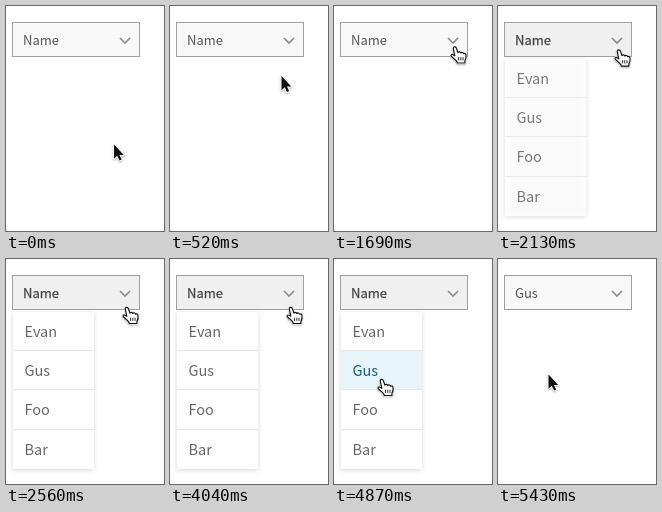
Animation, 158 px wide and 225 px high, one loop 6.43 s. Source, as an HTML page with a canvas:

```html
<!DOCTYPE html>
<html lang="en">
<head>
<meta charset="utf-8">
<title>Dropdown</title>
<style>
html, body { margin: 0; width: 100%; height: 100%; overflow: hidden; background: #fff; }
canvas { display: block; width: 158px; height: 225px; }
</style>
</head>
<body>
<canvas id="stage"></canvas>
<script>
const W = 158, H = 225, LOOP = 6430;
const OPEN = 2000, CLOSE = 5340;
const FONT = '"Noto Sans CJK JP", "Noto Sans CJK SC", "Noto Sans", sans-serif';
const ITEMS = ['Evan', 'Gus', 'Foo', 'Bar'];
const PICK = 1;
const MENU = { x: 7, y: 53, w: 81, h: 157, row: 39.2 };

// time, x, y of the pointer's hot spot
const PATH = [
  [40, 108, 138.5], [300, 111.5, 70], [520, 111.5, 70],
  [930, 121, 34], [1170, 121, 34], [1600, 121, 41],
  [1900, 121, 41], [2430, 121, 48.5], [4040, 121, 48.5],
  [4650, 48, 118.5], [4870, 48, 120.5], [5300, 50.5, 115.5]
];

const ARROW = new Path2D('M0 0V14.2L3.2 11.2L5.5 16L7.7 15L5.4 10.4H9.8Z');
const HAND = new Path2D('M-1.7 1.6C-2-.4 .8-.8 1.4 1.2L2.9 5.6C3.4 4.4 5.4 4.6 5.8 6' +
  'C6.6 5 8.3 5.4 8.7 6.7C9.6 6 10.8 6.6 11 8C11.4 10.4 11 12 10 13.6L9.9 16H2.2L1.9 14.6' +
  'C.4 12.6-1.2 11.4-3.2 9.8C-4.8 8.5-3.6 7-2 7.7L-.2 8.8Z');
const KNUCKLES = new Path2D('M3.6 10.2V13.4M5.8 10.2V13.4M8 10.2V13.4');

const canvas = document.getElementById('stage');
const ctx = canvas.getContext('2d');
const dpr = window.devicePixelRatio || 1;
canvas.width = W * dpr;
canvas.height = H * dpr;

const clamp = v => Math.max(0, Math.min(1, v));
const ease = p => p * p * (3 - 2 * p);

function pointerAt(t) {
  let a = PATH[0];
  for (const b of PATH) {
    if (t < b[0]) {
      const p = ease(clamp((t - a[0]) / (b[0] - a[0])));
      return { x: a[1] + (b[1] - a[1]) * p, y: a[2] + (b[2] - a[2]) * p };
    }
    a = b;
  }
  return { x: a[1], y: a[2] };
}

const inside = (p, x, y, w, h) => p.x >= x && p.x < x + w && p.y >= y && p.y < y + h;

function label(text, x, y, size, color) {
  ctx.font = `${size}px ${FONT}`;
  ctx.fillStyle = color;
  ctx.fillText(text, x, y);
}

function drawField(text, open) {
  ctx.fillStyle = open ? '#f0f0f0' : '#f8f8f8';
  ctx.fillRect(6, 16, 128, 35);
  ctx.strokeStyle = '#a0a0a0';
  ctx.lineWidth = 1;
  ctx.strokeRect(6.5, 16.5, 127, 34);
  label(text, 17, 39, 13, open ? '#444' : '#555');
  if (open) {
    ctx.strokeStyle = '#444';
    ctx.lineWidth = 0.25;
    ctx.strokeText(text, 17, 39);
  }
  ctx.strokeStyle = '#8c8c8c';
  ctx.lineWidth = 1.6;
  ctx.beginPath();
  ctx.moveTo(114, 32);
  ctx.lineTo(119, 37);
  ctx.lineTo(124, 32);
  ctx.stroke();
}

function drawMenu(alpha, hover) {
  const { x, y, w, h, row } = MENU;
  ctx.save();
  ctx.globalAlpha = alpha;
  ctx.save();
  ctx.shadowColor = 'rgba(0,0,0,.16)';
  ctx.shadowBlur = 5 * dpr;
  ctx.shadowOffsetY = dpr;
  ctx.fillStyle = '#fff';
  ctx.fillRect(x, y, w, h);
  ctx.restore();
  ITEMS.forEach((item, i) => {
    const top = Math.round(y + i * row);
    if (i === hover) {
      ctx.fillStyle = '#e7f4fa';
      ctx.fillRect(x, top, w, 39);
    }
    if (i) {
      ctx.fillStyle = '#e8e8e8';
      ctx.fillRect(x, top - 1, w, 1);
    }
    label(item, 18.5, top + 24.5, 14.5, i === hover ? '#1b5a7a' : '#666');
  });
  ctx.restore();
}

function drawPointer(p, hand) {
  ctx.save();
  ctx.translate(p.x, p.y);
  ctx.lineJoin = 'round';
  ctx.save();
  ctx.shadowColor = 'rgba(0,0,0,.3)';
  ctx.shadowBlur = 2 * dpr;
  ctx.shadowOffsetY = dpr;
  ctx.strokeStyle = '#fff';
  ctx.lineWidth = 2;
  ctx.stroke(hand ? HAND : ARROW);
  ctx.restore();
  ctx.fillStyle = hand ? '#fff' : '#111';
  ctx.fill(hand ? HAND : ARROW);
  if (hand) {
    ctx.strokeStyle = '#111';
    ctx.lineWidth = 1.2;
    ctx.stroke(HAND);
    ctx.lineWidth = 0.9;
    ctx.stroke(KNUCKLES);
  }
  ctx.restore();
}

function draw(t) {
  const p = pointerAt(t);
  const open = t >= OPEN && t < CLOSE;
  const alpha = clamp((t - OPEN) / 150) * clamp(1 - (t - CLOSE) / 90);
  const onMenu = open && inside(p, MENU.x, MENU.y, MENU.w, MENU.h);
  const hover = onMenu ? Math.floor((p.y - MENU.y) / MENU.row) : -1;

  ctx.setTransform(dpr, 0, 0, dpr, 0, 0);
  ctx.fillStyle = '#fff';
  ctx.fillRect(0, 0, W, H);
  drawField(t < CLOSE ? 'Name' : ITEMS[PICK], open);
  if (alpha > 0) drawMenu(alpha, t < CLOSE ? hover : PICK);
  drawPointer(p, onMenu || inside(p, 6, 16, 128, 35));
}

const start = performance.now();
function tick() {
  draw((performance.now() - start) % LOOP);
  requestAnimationFrame(tick);
}
tick();
</script>
</body>
</html>
```
